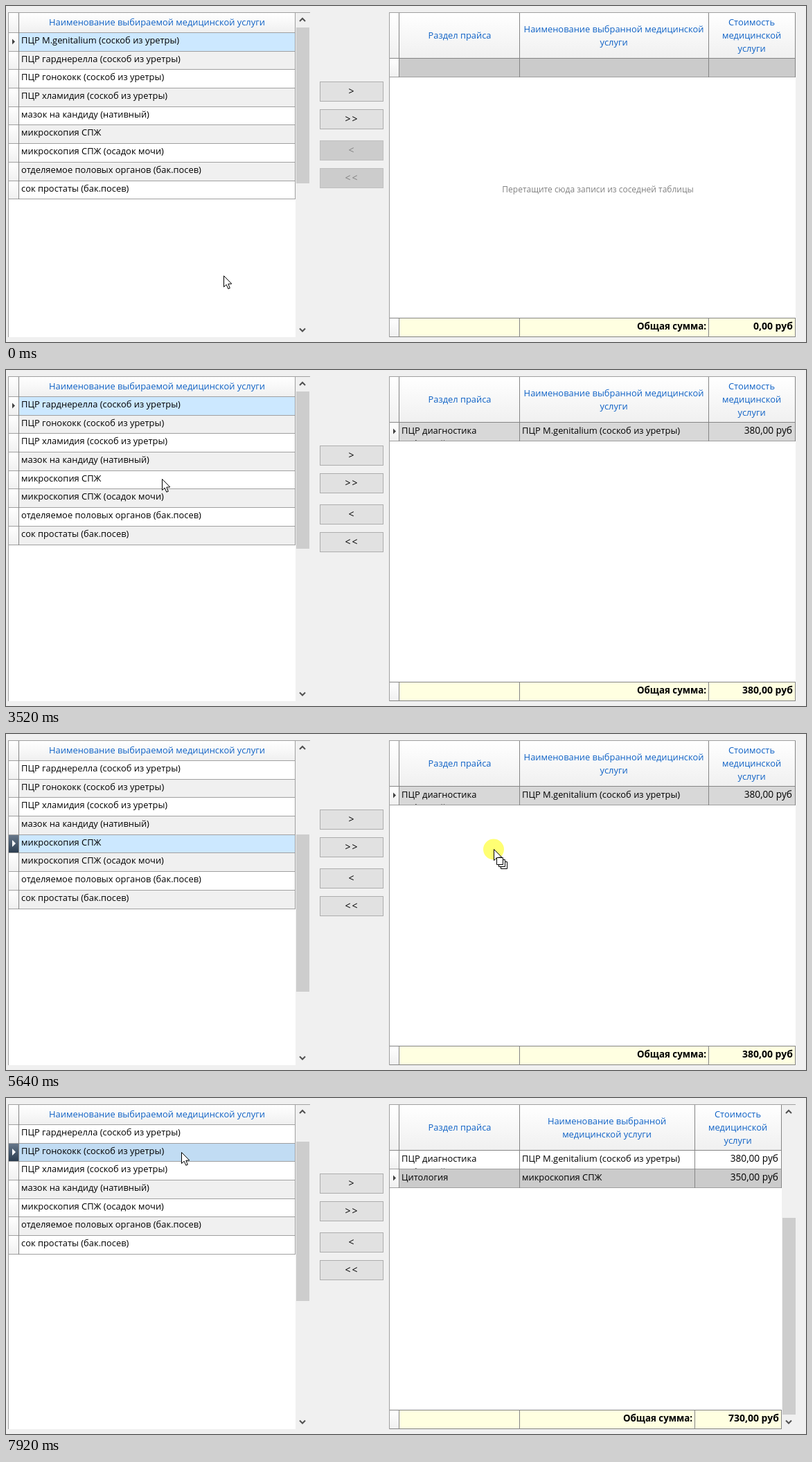
These frames come from a looping animation (1155x485 px, 8000 ms). An HTML page with a canvas:

```html
<!DOCTYPE html>
<html lang="ru">
<head>
<meta charset="utf-8">
<style>
html, body { margin: 0; width: 100%; height: 100%; overflow: hidden; background: #f0f0f0; }
canvas { display: block; }
</style>
</head>
<body>
<canvas id="stage" width="1155" height="485"></canvas>
<script>
const ctx = document.getElementById('stage').getContext('2d');
const LOOP = 8000, STEP = 40;
const DROP_1 = 2720, DROP_2 = 5880, PICK_2 = 3640, PICK_3 = 7760, FLASH = 80;
const FONT = '"Open Sans", "Noto Sans", sans-serif';
const LINE = '#a0a0a0', DARK = '#858585', BLUE = '#0f62c6';

const services = [
  'ПЦР M.genitalium (соскоб из уретры)', 'ПЦР гарднерелла (соскоб из уретры)',
  'ПЦР гонококк (соскоб из уретры)', 'ПЦР хламидия (соскоб из уретры)',
  'мазок на кандиду (нативный)', 'микроскопия СПЖ', 'микроскопия СПЖ (осадок мочи)',
  'отделяемое половых органов (бак.посев)', 'сок простаты (бак.посев)'
];
const chosen = [
  { section: ['ПЦР диагностика', 'инфекций'], name: services[0], price: '380,00 руб' },
  { section: ['Цитология'], name: services[5], price: '350,00 руб' }
];
const totals = ['0,00 руб', '380,00 руб', '730,00 руб'];

// Pointer path: time, x, y
const path = [
  [280, 314, 389], [360, 316, 386], [640, 328, 250], [880, 318, 120], [1120, 287, 60],
  [1600, 240, 50], [1760, 233, 48], [2040, 233, 48], [2280, 584, 111], [2440, 777, 151],
  [2720, 777, 151], [3040, 590, 142], [3360, 260, 154], [3520, 225, 157], [3800, 225, 157],
  [4080, 192, 156], [4200, 192, 156], [4280, 201, 156], [4440, 263, 163], [5080, 623, 166],
  [5640, 704, 166], [5880, 704, 166], [6640, 655, 155], [7000, 610, 96], [7160, 590, 92],
  [7520, 266, 80], [7680, 253, 78]
];

function pointerAt(t) {
  const i = path.findIndex(p => p[0] > t);
  if (i < 0) return path[path.length - 1].slice(1);
  if (i === 0) return path[0].slice(1);
  const [t0, x0, y0] = path[i - 1], [t1, x1, y1] = path[i];
  const k = (t - t0) / (t1 - t0);
  return [Math.round(x0 + (x1 - x0) * k), Math.round(y0 + (y1 - y0) * k)];
}

const within = (t, a, b) => t >= a && t < b;

function box(x0, y0, x1, y1, fill) {
  ctx.fillStyle = fill;
  ctx.fillRect(x0, y0, x1 - x0, y1 - y0);
}
const hline = (x0, x1, y, color = LINE) => box(x0, y, x1, y + 1, color);
const vline = (x, y0, y1, color = LINE) => box(x, y0, x + 1, y1, color);

function text(str, x, y, { color = '#000', size = 12.9, align = 'left', weight = 400, gap = 0 } = {}) {
  ctx.font = `${weight} ${size}px ${FONT}`;
  ctx.letterSpacing = gap + 'px';
  ctx.textAlign = align;
  ctx.fillStyle = color;
  ctx.fillText(str, x, y);
}

function shape(points, fill, stroke) {
  ctx.beginPath();
  points.forEach(([x, y]) => ctx.lineTo(x, y));
  ctx.closePath();
  ctx.fillStyle = fill;
  ctx.fill();
  if (stroke) {
    ctx.strokeStyle = stroke;
    ctx.lineWidth = 1;
    ctx.stroke();
  }
}

function shade(x0, y0, x1, y1, top, bottom) {
  const g = ctx.createLinearGradient(0, y0, 0, y1);
  g.addColorStop(0, top);
  g.addColorStop(1, bottom);
  box(x0, y0, x1, y1, g);
}
const raised = (x0, y0, x1, y1) => shade(x0, y0, x1, y1, '#fff', '#f0f0f0');

function marker(x, y0, y1, current, active) {
  if (active) shade(x, y0, x + 14, y1, '#66778a', '#2b3d50');
  else raised(x, y0, x + 14, y1);
  if (!current) return;
  const m = (y0 + y1) / 2 - 0.5, h = active ? 5 : 4;
  shape([[x + 5, m - h], [x + 5 + h, m], [x + 5, m + h]], active ? '#fff' : '#404040');
}

function chevron(x, y, dir) {
  ctx.beginPath();
  ctx.moveTo(x - 4, y + 2 * dir);
  ctx.lineTo(x, y - 2 * dir);
  ctx.lineTo(x + 4, y + 2 * dir);
  ctx.strokeStyle = '#505050';
  ctx.lineWidth = 2;
  ctx.stroke();
}

function scrollbar(x, top, bottom) {
  box(x, 10, x + 21, 478, '#f0f0f0');
  box(x + 1, top, x + 20, bottom, '#cdcdcd');
  chevron(x + 10, 20, 1);
  chevron(x + 10, 467.5, -1);
}

function leftTable(t) {
  const items = services.filter((_, i) => !(i === 0 && t >= DROP_1 || i === 5 && t >= DROP_2));
  const picked = t >= PICK_3 ? 1 : t >= PICK_2 ? 4 : 0;
  const active = within(t, 1840, DROP_1) || within(t, PICK_2, DROP_2) || t >= PICK_3;
  const fresh = within(t, PICK_2, PICK_2 + FLASH) || t >= PICK_3;
  const thumb = t >= PICK_3 ? [63, 293] : t >= DROP_2 ? [163, 392]
    : t >= PICK_2 ? [145, 372] : t >= DROP_1 ? [31, 258] : [31, 256];
  const lineY = i => Math.round(38 + 26.69 * i);

  box(3, 9, 439, 478, '#fff');
  raised(4, 10, 417, 38);
  items.forEach((item, i) => {
    const y0 = lineY(i) + 1, y1 = lineY(i + 1);
    const fill = i === picked ? (fresh ? '#c1dcf3' : '#cce8ff') : i % 2 ? '#f0f0f0' : '#fff';
    box(19, y0, 417, y1, fill);
    marker(4, y0, y1, i === picked, active && i === picked);
    hline(4, 18, y1);
    hline(18, 418, y1);
    text(item, 22, y0 + 15);
  });
  const end = lineY(items.length) + 1;
  hline(3, 418, 38);
  vline(18, 10, end, DARK);
  vline(417, 10, end);
  text('Наименование выбираемой медицинской услуги', 218, 28, { color: BLUE, align: 'center' });
  scrollbar(418, ...thumb);
  hline(3, 439, 9);
  vline(3, 9, 478);
}

function buttons(enabled) {
  [['>', 109], ['>>', 149], ['<', 194], ['<<', 234]].forEach(([label, y], i) => {
    const on = i < 2 || enabled;
    box(453, y, 545, y + 29, on ? '#adadad' : '#bfbfbf');
    box(454, y + 1, 544, y + 28, on ? '#e1e1e1' : '#cccccc');
    text(label, 499.5, y + 19, { color: on ? '#000' : '#838383', align: 'center', size: 14, gap: 2 });
  });
}

function rightTable(t) {
  const count = t >= DROP_2 ? 2 : t >= DROP_1 ? 1 : 0;
  const right = count === 2 ? 1119 : 1139, split = right - 125;
  const rowY = [76, 103, 130];

  box(553, 9, 1140, 478, '#fff');
  raised(554, 10, right, 75);
  const title = (lines, x, y) => lines.forEach((s, i) =>
    text(s, x, y + 19 * i, { color: BLUE, align: 'center' }));
  title(['Раздел прайса'], 655, 47);
  title(count === 2 ? ['Наименование выбранной', 'медицинской услуги']
    : ['Наименование выбранной медицинской', 'услуги'], (741 + split) / 2, 38);
  title(['Стоимость', 'медицинской', 'услуги'], (split + right) / 2, 28);

  const rows = Math.max(count, 1);
  for (let i = 0; i < rows; i++) {
    const y0 = rowY[i], y1 = rowY[i + 1] - 1, last = i === rows - 1;
    box(568, y0, right, y1, !last ? '#fff' : count === 1 ? '#d8d8d8' : '#cbcbcb');
    marker(554, y0, y1, count && last, false);
    if (count) {
      const row = chosen[i];
      ctx.save();
      ctx.beginPath();
      ctx.rect(568, y0, right - 568, y1 - y0);
      ctx.clip();
      row.section.forEach((s, k) => text(s, 571, y0 + 16 + 19 * k));
      text(row.name, 745, y0 + 16);
      text(row.price, right - 4, y0 + 16, { align: 'right', size: 13.7 });
      ctx.restore();
    }
    hline(553, right + 1, y1);
  }

  box(568, 451, right, 477, '#ffffe1');
  raised(554, 451, 567, 477);
  hline(553, right + 1, 75, DARK);
  hline(553, right + 1, 450, DARK);
  hline(553, right + 1, 477, DARK);
  for (const x of [567, 741, split, right]) {
    vline(x, 10, rowY[rows], DARK);
    vline(x, 450, 478, DARK);
  }
  text('Общая сумма:', split - 3, 467, { align: 'right', weight: 700, size: 13.3 });
  text(totals[count], right - 3, 467, { align: 'right', weight: 700, size: 14 });
  if (!count) text('Перетащите сюда записи из соседней таблицы', 854.5, 269,
    { color: '#808080', align: 'center', size: 12 });
  if (count === 2) scrollbar(1120, 173, 457);
  hline(553, 1140, 9);
  vline(553, 9, 478);
}

function tooltip() {
  box(571, 78, 690, 120, 'rgba(0,0,0,.25)');
  box(570, 77, 689, 119, 'rgba(0,0,0,.35)');
  box(568, 74, 687, 118, '#606060');
  box(569, 75, 686, 117, '#fff');
  chosen[0].section.forEach((s, i) => text(s, 571, 92 + 19 * i));
}

function arrow() {
  shape([[0, 0], [0, 16], [3.7, 12.7], [6.3, 18.7], [8.8, 17.7], [6.3, 11.7], [11.3, 11.5]], '#fff', '#000');
}

function pages() {
  for (const [x, y] of [[10, 18], [7, 15], [4, 12]]) {
    shape([[x, y], [x + 9, y], [x + 9, y + 10], [x, y + 10]], '#fff', '#000');
  }
}

function noDrop() {
  ctx.beginPath();
  ctx.arc(6, 7, 6.5, 0, 7);
  ctx.moveTo(2, 11);
  ctx.lineTo(10, 3);
  for (const [color, width] of [['#000', 3.4], ['#f4f4f4', 1.5]]) {
    ctx.strokeStyle = color;
    ctx.lineWidth = width;
    ctx.stroke();
  }
}

function pointer(t) {
  const [x, y] = pointerAt(t);
  const dragging = within(t, 2080, DROP_1) || within(t, 4280, DROP_2);
  const pressed = dragging || within(t, 1840, 2080) ||
    within(t, PICK_2, PICK_2 + FLASH) || within(t, PICK_3, PICK_3 + FLASH);
  ctx.save();
  ctx.translate(x + 0.5, y + 0.5);
  if (pressed) {
    ctx.beginPath();
    ctx.arc(-0.5, 0, 15, 0, 7);
    ctx.fillStyle = 'rgba(255,255,0,.55)';
    ctx.fill();
  }
  if (dragging && x < 553) noDrop();
  else {
    arrow();
    if (dragging) pages();
  }
  ctx.restore();
}

function draw(now) {
  const t = Math.floor(now % LOOP / STEP) * STEP;
  box(0, 0, 1155, 485, '#f0f0f0');
  leftTable(t);
  buttons(t >= DROP_1);
  rightTable(t);
  if (within(t, 6880, 7200)) tooltip();
  pointer(t);
}

const start = performance.now();
function tick() {
  draw(performance.now() - start);
  requestAnimationFrame(tick);
}
tick();
</script>
</body>
</html>
```
